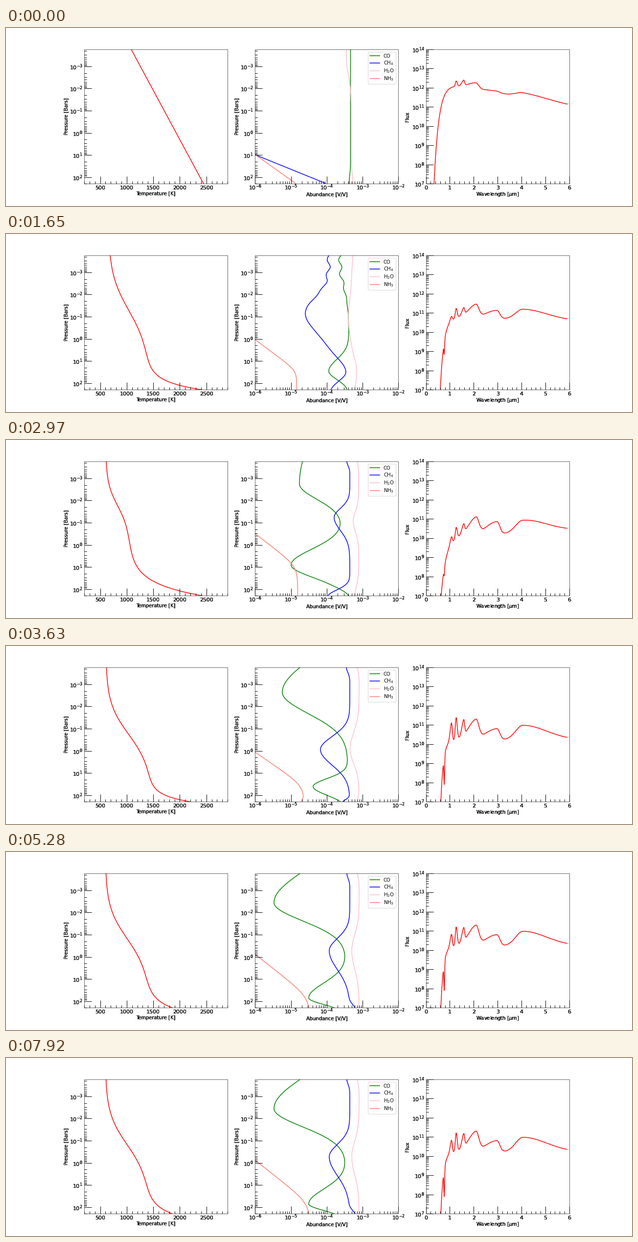
Write a matplotlib script that moves like this. It is 1280 px wide and 366 px high and loops after 8000 ms.

```python
import numpy as np
import matplotlib.pyplot as plt
from matplotlib.animation import FuncAnimation
from matplotlib.patches import Rectangle

W, H, DPI = 1280, 366, 72
LOOP, STEP = 8000, 40
TOP, BOTTOM, PANEL_W = 43.92, 320.25, 293.2
LEFTS = (160, 509.2, 858.6)
P_LOW, P_HIGH = np.log10(1.7e-4), np.log10(200)

# Iterations start at 990 ms and are held 330 ms each; values run along poses.
HOLD, FIRST = 330, 990
PHASE = [0, 0.1, 0.66, 1, 1.85, 1.96, 1.99, 2, 2.6, 3, 3.3, 3.5, 3.7, 3.97, 4]

plt.rcParams["font.family"] = "DejaVu Sans"
plt.rcParams["mathtext.fontset"] = "dejavusans"

depth = np.linspace(TOP, BOTTOM, 277)
wave = np.linspace(870, 1147.3, 556)


# ---- curve shapes, in stage pixels ----

def bump(x, center, before, after):
    return np.exp(-((x - center) / np.where(x < center, before, after)) ** 2)


def profile(base, *bumps):
    """Abundance along depth: a constant bent by (size, center, above, below)."""
    return base + sum(size * bump(depth, *shape) for size, *shape in bumps)


def ramp(limit, knee, slope, soft):
    """Straight rise that levels off at limit around the knee."""
    return limit - slope * soft * np.logaddexp(0, (knee - depth) / soft)


def temperature(cool, rise, center, width, heat, scale):
    """Logistic step through the upper layers plus deep exponential heating."""
    return (cool + rise / (1 + np.exp((center - depth) / width))
            + heat * np.exp((depth - 320) / scale))


BANDS = [(911, 4, 2.2), (920.5, 2.5, 3), (936, 5.5, 2.5),
         (961, 22, 8), (1004, 32, 8), (1057, 21, 68)]


def spectrum(base, tail, edge, fall, dip, peaks):
    """Sloping floor with a steep blue edge, one dip and six emission bands."""
    y = base + (tail - base) * (wave - 925) / 222
    y += 130 * np.exp((edge - wave) / fall) + dip * bump(wave, 896, 1, 1.2)
    y -= sum(p * bump(wave, *band) for p, band in zip(peaks, BANDS))
    return np.minimum(y, 380)


ripple = 3.5 * np.sin((depth - 60) / 5) * bump(depth, 70, 50, 50)

poses = [
    dict(temp=np.linspace(256, 404, len(depth)),
         co=profile(704.5, (-2.5, 315, 20, 40)),
         ch4=ramp(655, 320, 2.45, 1),
         h2o=profile(706, (-10, 60, 99, 50), (3, 315, 25, 25)),
         nh3=ramp(593, 320, 1.4, 1),
         flux=spectrum(119, 158, 880, 10, 0, (0, 11, 11, 12, 3, 9))),
    dict(temp=temperature(209, 84, 157, 38, 107, 17),
         co=profile(701, (-18, 60, 50, 65), (-41, 282, 34, 24)) + ripple,
         ch4=profile(660, (-48, 163, 45, 50), (35, 284, 38, 25)) + ripple,
         h2o=profile(707, (2, 44, 9, 25), (-7, 172, 50, 45), (10, 282, 36, 55)),
         nh3=ramp(594.5, 281, 1.33, 6.5),
         flux=spectrum(172, 178, 889, 7.5, 25, (9, 20, 14, 26, 17, 21))),
    dict(temp=temperature(204, 48, 135, 24, 148, 27),
         co=profile(690, (-90, 90, 170, 45), (-107, 257, 46, 35), (14, 320, 16, 16)),
         ch4=profile(703, (-6, 44, 9, 12), (-32, 159, 26, 38), (-45, 322, 19, 9)),
         h2o=profile(721, (-2, 44, 9, 12), (-11, 167, 28, 30), (-8, 322, 28, 9)),
         nh3=ramp(596.5, 259.7, 1.3, 10),
         flux=spectrum(198, 186, 889, 10, 15, (14, 23, 17, 34, 26, 26))),
    dict(temp=temperature(204, 94, 182, 33, 79, 13.5),
         co=profile(699, (-134, 95, 91, 62), (-71, 289, 23, 25)),
         ch4=profile(703, (-7, 44, 9, 14), (-60, 213, 38, 45), (-15, 322, 8, 8)),
         h2o=profile(722, (-3, 44, 9, 14), (-18.5, 212, 48, 42), (-4, 322, 14, 9)),
         nh3=ramp(610, 287.7, 1.45, 10) - 4 * bump(depth, 322, 10, 9),
         flux=spectrum(193, 193, 889, 5.5, 55, (37, 45, 31, 39, 23, 30))),
    dict(temp=temperature(203, 89, 178, 33, 48.5, 19),
         co=profile(696, (-148, 104, 90, 53), (-77, 300, 43, 19)),
         ch4=profile(703, (-6, 44, 9, 14), (-42, 203, 36, 55), (11, 322, 12, 9)),
         h2o=profile(722, (-3, 44, 9, 14), (-15, 203, 45, 52)),
         nh3=ramp(622, 299, 1.27, 12.5),
         flux=spectrum(193, 193, 889, 5.5, 55, (26, 38, 27, 39, 23, 30))),
]


# ---- stage in pixel coordinates ----

fig = plt.figure(figsize=(W / DPI, H / DPI), dpi=DPI, facecolor="white")
ax = fig.add_axes([0, 0, 1, 1])
ax.set_xlim(0, W)
ax.set_ylim(H, 0)
ax.axis("off")


def label(x, y, s, size=11, **kw):
    for _ in range(3):  # repeated drawing gives the heavy lettering
        ax.text(x, y, s, size=size, **kw)


def power(n):
    return rf"$\mathdefault{{10^{{{n}}}}}$"


def log_minor(lo, hi):
    v = [d + np.log10(k) for d in range(-7, 15) for k in range(2, 10)]
    return [u for u in v if lo <= u <= hi]


def x_ticks(pos, major, minor, names, base):
    for vals, size in ((major, 15), (minor, 5)):
        ax.vlines([pos(v) for v in vals], BOTTOM - size, BOTTOM, "k", lw=1, zorder=3)
    for v, s in zip(major, names):
        label(pos(v), base, s, ha="center", va="baseline")


def y_ticks(left, pos, major, minor):
    for vals, size in ((major, 15), (minor, 5)):
        ax.hlines([pos(v) for v in vals], left, left + size, "k", lw=1, zorder=3)
    for v in major:
        label(left - 3.5, pos(v), power(v), ha="right", va="center_baseline")


def panel(left, xlabel, ylabel, base):
    frame = Rectangle((left, TOP), PANEL_W, BOTTOM - TOP, fc="none", ec="k",
                      lw=0.6, zorder=2.5)
    ax.add_patch(frame)
    label(left + PANEL_W / 2, base, xlabel, 10, ha="center", va="baseline")
    label(left - 32.3, (TOP + BOTTOM) / 2, ylabel, 10, rotation=90,
          ha="center", va="bottom", rotation_mode="anchor")
    return frame


def scale(start, size, lo, hi):
    return lambda v: start + (v - lo) / (hi - lo) * size


frames = [panel(LEFTS[0], "Temperature [K]", "Pressure [Bars]", 344),
          panel(LEFTS[1], "Abundance [V/V]", "Pressure [Bars]", 345),
          panel(LEFTS[2], r"Wavelength [$\mu$m]", "Flux", 345)]

kelvin = range(500, 2501, 500)
x_ticks(scale(LEFTS[0], PANEL_W, 200, 2900), kelvin, range(200, 2901, 100),
        kelvin, 331.7)
x_ticks(scale(LEFTS[1], PANEL_W, -6, -2), range(-6, -1), log_minor(-6, -2),
        [power(n) for n in range(-6, -1)], 333)
x_ticks(scale(LEFTS[2], PANEL_W, 0, 6), range(7), np.arange(0, 6.1, 0.2),
        range(7), 331.7)
pressure = scale(TOP, BOTTOM - TOP, P_LOW, P_HIGH)
for left in LEFTS[:2]:
    y_ticks(left, pressure, range(-3, 3), log_minor(P_LOW, P_HIGH))
y_ticks(LEFTS[2], scale(BOTTOM, TOP - BOTTOM, 7, 14), range(7, 15), log_minor(7, 14))


def curve(frame, color, name=None):
    line, = ax.plot([], [], color=color, lw=1.5, label=name, zorder=2)
    line.set_clip_path(frame)
    return line


lines = {
    "temp": curve(frames[0], "red"),
    "co": curve(frames[1], "green", "CO"),
    "ch4": curve(frames[1], "blue", "CH$_4$"),
    "h2o": curve(frames[1], "pink", "H$_2$O"),
    "nh3": curve(frames[1], "salmon", "NH$_3$"),
    "flux": curve(frames[2], "red"),
}
ax.legend(handles=[lines[k] for k in ("co", "ch4", "h2o", "nh3")], fontsize=10,
          labelspacing=0.22, loc="upper right",
          bbox_to_anchor=(LEFTS[1] + PANEL_W, TOP), bbox_transform=ax.transData)


def draw(k):
    now = (k + 1) * STEP - 1
    step = (now - FIRST + HOLD) // HOLD
    phase = PHASE[min(max(step, 0), len(PHASE) - 1)]
    i = min(int(phase), len(poses) - 2)
    w = phase - i
    for key, line in lines.items():
        v = (1 - w) * poses[i][key] + w * poses[i + 1][key]
        if key == "flux":
            line.set_data(wave, v)
        else:
            line.set_data(v, depth)
    return list(lines.values())


anim = FuncAnimation(fig, draw, frames=LOOP // STEP, interval=STEP,
                     repeat=True, repeat_delay=0)
plt.show()
```
